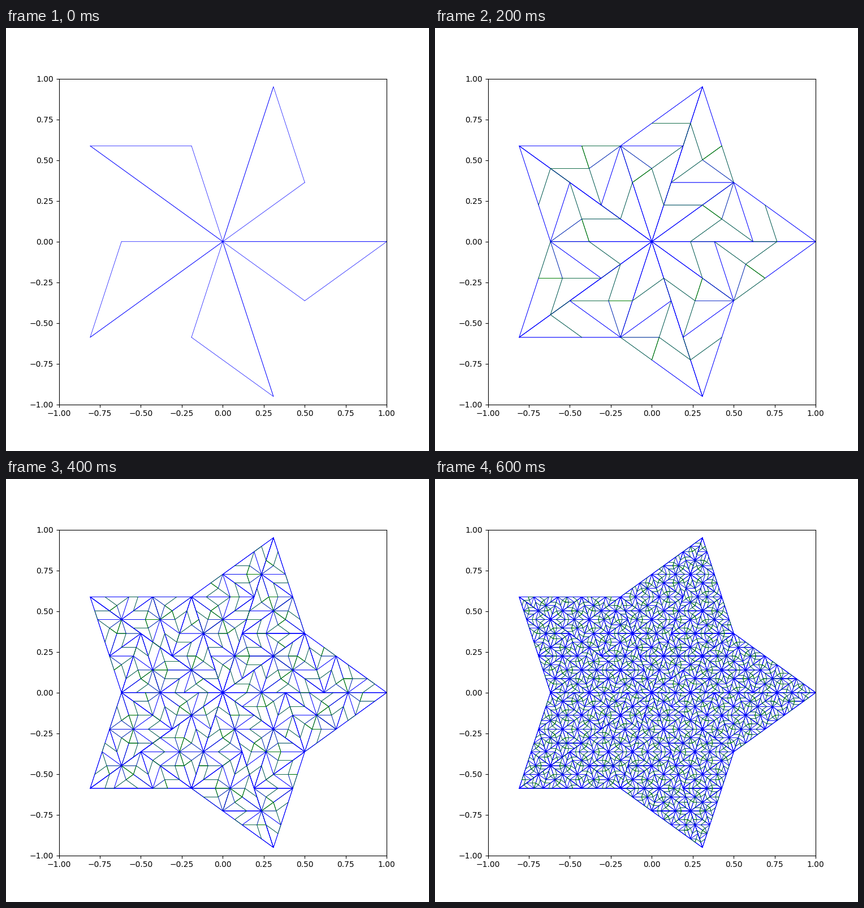
These frames come from a looping animation (748 by 748 pixels, 700 ms). A matplotlib script:

```python
import math

import matplotlib.pyplot as plt
from matplotlib.animation import FuncAnimation
from matplotlib.collections import LineCollection

PHI = (1 + math.sqrt(5)) / 2
STEPS = 7
ACUTE, OBTUSE = 0, 1
COLORS = {ACUTE: "green", OBTUSE: "blue"}


def polar(radius, angle):
    return complex(radius * math.cos(angle), radius * math.sin(angle))


def star():
    """Ten obtuse triangles around the centre, as (kind, a, b, c)."""
    tris = []
    for k in range(5):
        turn = 2 * math.pi * k / 5
        tip = polar(1, turn)
        tris.append((OBTUSE, polar(1 / PHI, turn - math.pi / 5), tip, 0j))
        tris.append((OBTUSE, polar(1 / PHI, turn + math.pi / 5), 0j, tip))
    return tris


def subdivide(tris):
    out = []
    for kind, a, b, c in tris:
        if kind == ACUTE:
            p = a + (b - a) / PHI
            out += [(ACUTE, c, p, b), (OBTUSE, p, c, a)]
        else:
            q = b + (a - b) / PHI
            r = b + (c - b) / PHI
            out += [(OBTUSE, r, c, a), (OBTUSE, q, r, b), (ACUTE, r, q, a)]
    return out


def outline(tris):
    """Two sides of each triangle; the third belongs to its neighbour."""
    paths = [[(z.real, z.imag) for z in corners] for _, *corners in tris]
    return LineCollection(paths, colors=[COLORS[t[0]] for t in tris],
                          linewidths=0.5, capstyle="projecting",
                          joinstyle="round", zorder=2)


fig, ax = plt.subplots(figsize=(7.48, 7.48), dpi=100)
ax.set(xlim=(-1, 1), ylim=(-1, 1))

layers = []
tris = star()
for _ in range(STEPS):
    layers.append(ax.add_collection(outline(tris), autolim=False))
    tris = subdivide(tris)


def draw(step):
    for i, layer in enumerate(layers):
        layer.set_visible(i <= step)
    return layers


anim = FuncAnimation(fig, draw, frames=STEPS, interval=100,
                     repeat=True, repeat_delay=0, blit=False)
plt.show()
```
